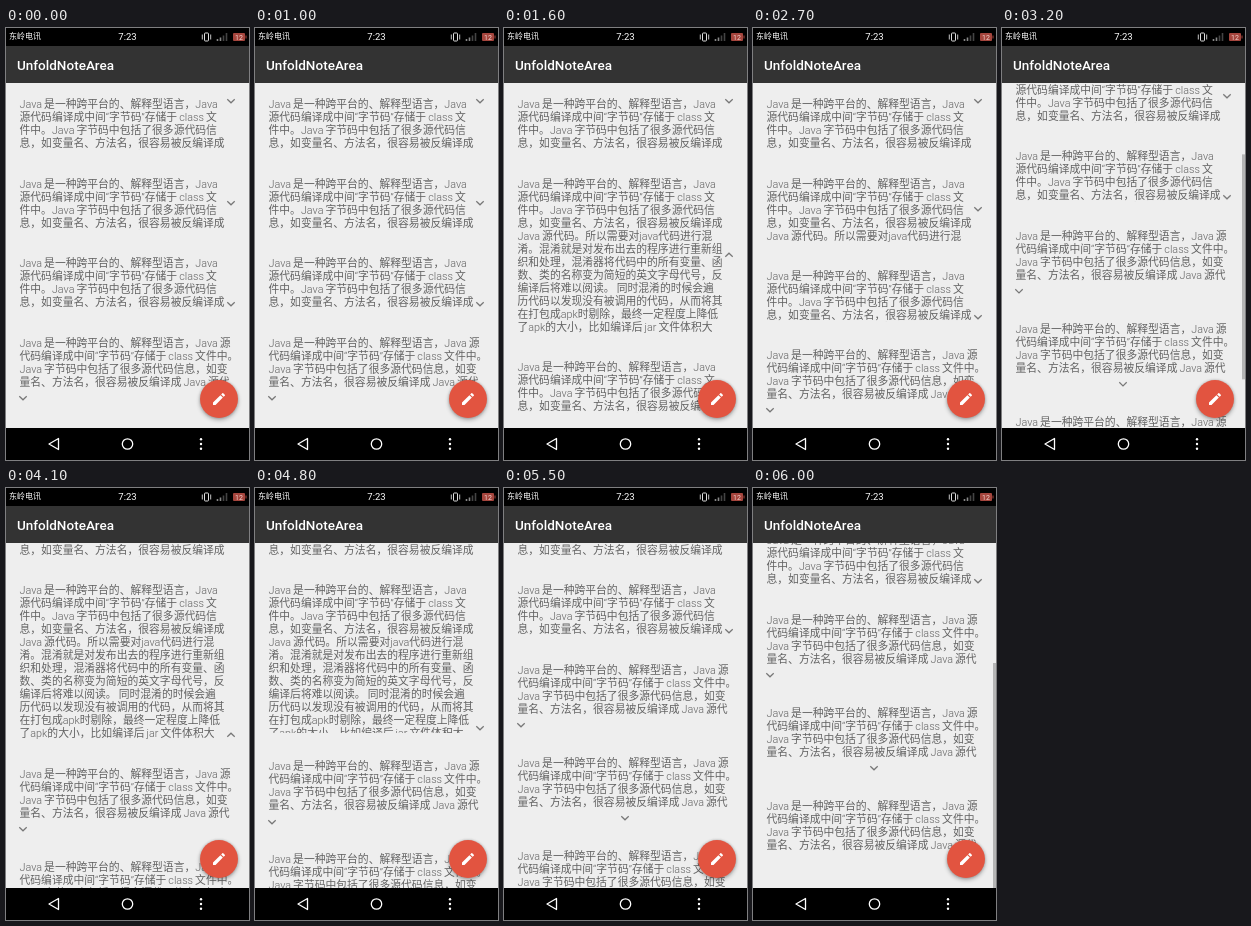
These frames come from a looping animation (243x432 px, 6.1 s). An HTML page:

```html
<!DOCTYPE html>
<html lang="zh-CN">
<head>
<meta charset="utf-8">
<title>Expandable text list</title>
<style>
:root { --loop: 6100ms; --ease: cubic-bezier(.37, 0, .63, 1); --fling: cubic-bezier(.25, .4, .35, 1); }
* { box-sizing: border-box; }
html, body { margin: 0; width: 100%; height: 100%; overflow: hidden; background: #eee; }
body { position: relative; font-family: Roboto, "Noto Sans CJK SC", "Noto Sans CJK", sans-serif; }
header, main, footer, .fab { position: absolute; left: 0; width: 243px; }

header { top: 0; height: 55px; z-index: 2; background: #333; color: #fff; }
.status { position: absolute; inset: 0 0 auto; height: 18px; background: #000; font-size: 9.5px; line-height: 18px; }
.carrier { position: absolute; left: 3px; font-size: 8px; }
.clock { position: absolute; left: 0; right: 0; text-align: center; }
.status svg { position: absolute; left: 0; top: 0; }
h1 { position: absolute; left: 11px; top: 27px; margin: 0; font-size: 13.5px; font-weight: 500; line-height: 20px; white-space: nowrap; }

main { top: 55px; height: 345px; overflow: hidden; }
.list { padding-top: 15px; animation: scroll var(--loop) infinite; }
.item { position: relative; margin-bottom: 27.6px; }
.text {
  height: 52px; overflow: hidden; padding-left: 13.5px; white-space: pre;
  font-size: 10.8px; font-weight: 300; line-height: 13px; word-spacing: -.6px; color: #626262;
}
.item.below { margin-bottom: 41.2px; }
.arrow { position: absolute; width: 10px; height: 6px; }
.arrow path { fill: none; stroke: #777; stroke-width: 1.2; }
.right { left: 220px; }
.left { left: 12px; }
.center { left: 116px; }
.top { top: 0; }
.middle { top: calc(50% - 3.5px); }
.bottom { bottom: 2px; }
.below .arrow { bottom: -12.3px; }

.second .text { animation: open2 var(--loop) infinite var(--ease); }
.second .arrow { animation: flip2 var(--loop) infinite step-end; }
.third .text { animation: open3 var(--loop) infinite var(--ease); }
.third .arrow { animation: flip3 var(--loop) infinite step-end; }

.thumb {
  position: absolute; top: 0; right: 0; width: 3px; height: 225px; background: #b5b5b5;
  animation: thumb var(--loop) infinite, fade var(--loop) infinite linear;
}
.fab {
  left: 194px; top: 351.5px; width: 38px; height: 38px; z-index: 1; border-radius: 50%;
  background: #e25440; box-shadow: 0 2px 4px rgba(0, 0, 0, .3), 0 0 3px rgba(0, 0, 0, .2);
}
.fab svg { position: absolute; left: 11px; top: 11px; }
footer { top: 400px; height: 32px; background: #000; }

@keyframes open2 {
  0%, 17.21% { height: 52px; }
  22.95%, 39.84% { height: 156px; }
  45.57%, 100% { height: 52px; }
}
@keyframes flip2 {
  0% { transform: none; }
  17.21% { transform: scaleY(-1); }
  39.84%, 100% { transform: none; }
}
@keyframes open3 {
  0%, 60.98% { height: 52px; }
  66.72%, 77.7% { height: 156px; }
  83.44%, 100% { height: 52px; }
}
@keyframes flip3 {
  0% { transform: none; }
  60.98% { transform: scaleY(-1); }
  77.7%, 100% { transform: none; }
}
@keyframes scroll {
  0% { transform: none; }
  48.36% { transform: translateY(0); animation-timing-function: var(--fling); }
  56.56% { transform: translateY(-133px); }
  90.82% { transform: translateY(-133px); animation-timing-function: var(--fling); }
  98.03%, 100% { transform: translateY(-183px); }
}
@keyframes thumb {
  0% { transform: translateY(3px); }
  48.36% { transform: translateY(3px); animation-timing-function: var(--fling); }
  56.56% { transform: translateY(88px); }
  90.82% { transform: translateY(88px); animation-timing-function: var(--fling); }
  98.03%, 100% { transform: translateY(120px); }
}
@keyframes fade {
  0%, 48.36% { opacity: 0; }
  48.5%, 61.5% { opacity: 1; }
  65.6%, 90.82% { opacity: 0; }
  91%, 100% { opacity: 1; }
}
</style>
</head>
<body>
<header>
  <div class="status">
    <span class="carrier">东岭电讯</span>
    <span class="clock">7:23</span>
    <svg width="243" height="18" fill="none" stroke="#ddd">
      <rect x="198.5" y="5" width="4" height="8" rx=".8"/>
      <path d="M196.3 6.5v5M204.7 6.5v5" stroke-width=".9"/>
      <path d="M211.5 13v-2M214.5 13v-3.5" stroke="#888" stroke-width="1.6"/>
      <path d="M217.5 13v-5.5M220.5 13V5" stroke="#444" stroke-width="1.6"/>
      <rect x="227" y="5" width="12" height="8" rx="1" fill="#a5453d" stroke="none"/>
      <path d="M240 7.5v3" stroke="#a5453d"/>
      <text x="233" y="11.6" font-size="7" text-anchor="middle" fill="#f3d4cf" stroke="none">12</text>
    </svg>
  </div>
  <h1>UnfoldNoteArea</h1>
</header>

<main>
  <div class="list"></div>
  <div class="thumb"></div>
</main>

<div class="fab">
  <svg width="16" height="16" viewBox="0 0 24 24" fill="#fff">
    <path d="M3 17.2V21h3.8L17.8 9.9l-3.7-3.7zM20.7 7a1 1 0 0 0 0-1.4l-2.3-2.3a1 1 0 0 0-1.4 0l-1.8 1.8 3.7 3.7z"/>
  </svg>
</div>

<footer>
  <svg width="243" height="32" fill="none" stroke="#fff" stroke-width="1.3" stroke-linejoin="round">
    <path d="M52.5 10.5v11L43 16z"/>
    <circle cx="121.5" cy="16" r="5.2"/>
    <g fill="#fff" stroke="none">
      <circle cx="195" cy="11.3" r="1.2"/><circle cx="195" cy="16" r="1.2"/><circle cx="195" cy="20.7" r="1.2"/>
    </g>
  </svg>
</footer>

<script>
const narrow = `Java 是一种跨平台的、解释型语言，Java
源代码编译成中间“字节码”存储于 class 文
件中。Java 字节码中包括了很多源代码信
息，如变量名、方法名，很容易被反编译成
Java 源代码。所以需要对java代码进行混
淆。混淆就是对发布出去的程序进行重新组
织和处理，混淆器将代码中的所有变量、函
数、类的名称变为简短的英文字母代号，反
编译后将难以阅读。 同时混淆的时候会遍
历代码以发现没有被调用的代码，从而将其
在打包成apk时剔除，最终一定程度上降低
了apk的大小，比如编译后 jar 文件体积大`;
const wide = `Java 是一种跨平台的、解释型语言，Java 源
代码编译成中间“字节码”存储于 class 文件中。
Java 字节码中包括了很多源代码信息，如变
量名、方法名，很容易被反编译成 Java 源代`;

const item = (text, kind, arrow) => `<div class="item ${kind}"><div class="text">${text}</div>
  <svg class="arrow ${arrow}" viewBox="0 0 10 6"><path d="M1.3 1.2 5 4.8 8.7 1.2"/></svg></div>`;

document.querySelector('.list').innerHTML = [
  item(narrow, 'first', 'right top'),
  item(narrow, 'second', 'right middle'),
  item(narrow, 'third', 'right bottom'),
  item(wide, 'below', 'left'),
  item(wide, 'below', 'center'),
  item(wide, 'below', 'right'),
].join('');
</script>
</body>
</html>
```
